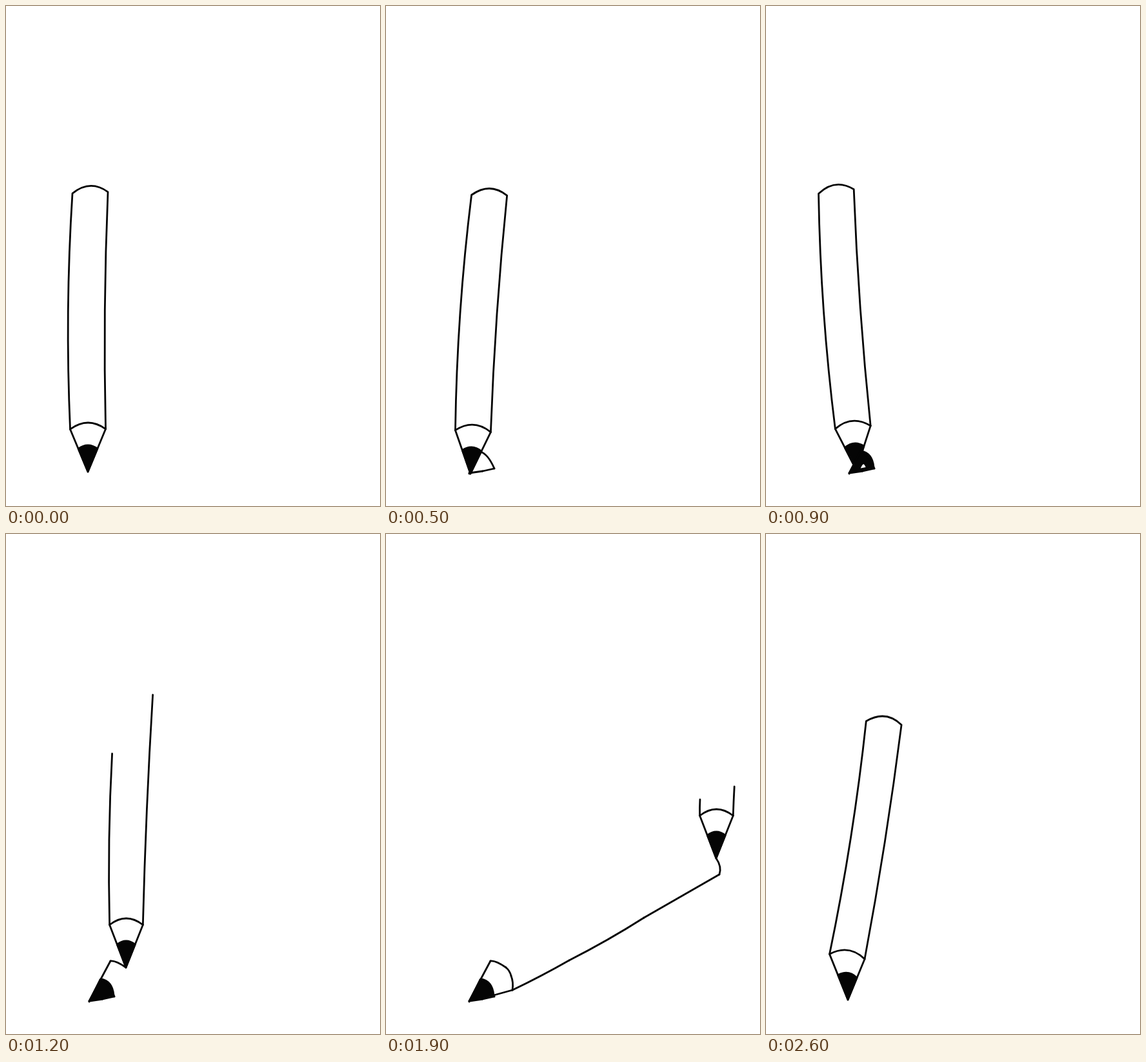
Write an HTML page with a canvas that moves like this. It is 580 by 774 pixels and loops after 2700 ms.

```html
<!DOCTYPE html>
<html lang="en">
<head>
<meta charset="utf-8">
<title>Pencil drawing a pencil</title>
<style>
  html, body { margin: 0; width: 100%; height: 100%; overflow: hidden; background: #fff; }
  canvas { display: block; }
</style>
</head>
<body>
<canvas id="stage" width="580" height="774"></canvas>
<script>
const ctx = document.getElementById('stage').getContext('2d');
const STEP = 100, STEPS = 27, INK = '#050505';

// Drawing pencil per step: tip x, tip y, tilt in degrees, left and right side length
const poses = [
  [127, 721, -.4], [130, 726, -.3], [145, 691, 0], [169, 718, 0], [150, 720, 2],
  [131, 724, 3], [152, 698, 8], [170, 712, 6.6], [160, 712, 2], [140, 718, -5],
  [150, 695, 0], [163, 662, 0, 355, 355],
  [186, 671, 0, 265, 356], [194, 684, 0, 235, 310], [197, 706, 0, 205, 265],
  [182, 710, 0, 175, 220], [284, 659, 0, 144, 180], [400, 594, 0, 95, 130],
  [517, 527, 0, 55, 90], [512, 502, 0, 25, 45], [481, 487, 0, 2, 6],
  [370, 547, 0], [268, 606, 0], [161, 659, 0],
  [129, 722, 47], [128, 721, 27], [127, 721, 8]
];

// Strokes on the paper: step of appearance, path
const strokes = [
  [2, 'M129 724L146 690'],
  [3, 'M146 690Q158 693 168 716'],
  [4, 'M168 716L150 720'],
  [5, 'M150 720L129 723'],
  [11, 'M147 689L162 661'],
  [12, 'M162 661Q170 660 186 671'],
  [13, 'M186 671Q192 676 194 684'],
  [14, 'M194 684Q198 694 196 706'],
  [15, 'M196 706L167 714'],
  [16, 'M196 706Q242 684 284 660'],
  [17, 'M284 660Q345 629 400 594'],
  [18, 'M400 594L517 527'],
  [19, 'M517 527Q521 515 512 502'],
  [20, 'M512 502Q498 482 481 487'],
  [21, 'M481 487Q430 514 370 547'],
  [22, 'M370 547Q340 565 300 590L268 606'],
  [23, 'M268 606L225 627 162 659']
].map(([step, d]) => [step, new Path2D(d)]);

const lead = new Path2D('M129 723L147 689Q165 692 167 714Z');
const hole = new Path2D('M1 -13Q8 -8 12 3L-14 8Q-6 -10 1 -13Z');
const holeSize = { 6: 1.3, 7: 1, 8: .65, 9: .3 };
const stub = new Path2D('M161 660L157 653Q151 645 154 643Q158 641 160 645Q164 640 166 643Q167 647 163 653Z');

function shape(d, fill) {
  const path = new Path2D(d);
  if (fill) { ctx.fillStyle = fill; ctx.fill(path); }
  if (fill !== '#fff') ctx.stroke(path);
}

function drawPencil(step) {
  const [x, y, tilt, left = 365, right = 367] = poses[step];
  const rising = step > 23, open = step > 11 && !rising;
  const shift = rising ? -11 : 0, width = open ? .94 : 1;
  const lx = -27 * width + shift, rx = 28 * width + shift, sy = -66;
  const tlx = lx + left * (open ? .015 : .0165), trx = rx + right * (open ? .043 : .0165);
  const bend = rising ? 9 : open ? -6 * left / 300 : step > 5 && step < 9 ? -5 : -10;
  const cap = `Q${(tlx + trx) / 2} ${sy - right - 20} ${trx} ${sy - right}`;
  const leftSide = `M${lx} ${sy}Q${(lx + tlx) / 2 + bend} ${sy - left / 2} ${tlx} ${sy - left}`;
  const rightSide = `Q${(rx + trx) / 2 + bend * .6} ${sy - right / 2} ${rx} ${sy}`;
  const shoulder = `M${lx} ${sy}Q${(lx + rx) / 2} ${sy - 20} ${rx} ${sy}`;

  ctx.save();
  ctx.translate(x, y);
  ctx.rotate(tilt * Math.PI / 180);
  if (step < 21 || rising) {
    shape(`${leftSide}${open ? 'L' + trx + ' ' + (sy - right) : cap}${rightSide}L0 0Z`, '#fff');
    shape(`${leftSide}${open ? 'M' + trx + ' ' + (sy - right) : cap}${rightSide}`);
    shape(shoulder);
  }
  const edge = step === 21 ? .8 : step === 22 ? .5 : 1;
  shape(`M${lx * edge} ${sy * edge}L0 0L${rx * edge} ${sy * edge}`);
  const k = .54;
  shape(`M0 0L${lx * k} ${sy * k}Q${(lx + rx) / 2 * k} ${sy * k - 11} ${rx * k} ${sy * k}Z`, INK);
  ctx.restore();
}

function drawPaper(step) {
  if (step > 5) {
    ctx.fillStyle = INK;
    ctx.fill(lead);
    ctx.stroke(lead);
    if (holeSize[step]) {
      ctx.save();
      ctx.translate(151, 713);
      ctx.scale(holeSize[step], holeSize[step]);
      ctx.fillStyle = '#fff';
      ctx.fill(hole);
      ctx.restore();
    }
  }
  for (const [start, path] of strokes) if (step >= start) ctx.stroke(path);
}

function frame() {
  const step = Math.floor(performance.now() / STEP) % STEPS;
  ctx.fillStyle = '#fff';
  ctx.fillRect(0, 0, 580, 774);
  ctx.strokeStyle = INK;
  ctx.lineWidth = 2.8;
  ctx.lineCap = ctx.lineJoin = 'round';
  if (step === 23) {
    drawPaper(step);
    ctx.fillStyle = INK;
    ctx.fill(stub);
  } else if (step > 23) {
    drawPencil(step);
  } else if (step > 5 && step < 10) {
    drawPencil(step);
    drawPaper(step);
  } else {
    drawPaper(step);
    drawPencil(step);
  }
  requestAnimationFrame(frame);
}
frame();
</script>
</body>
</html>
```
